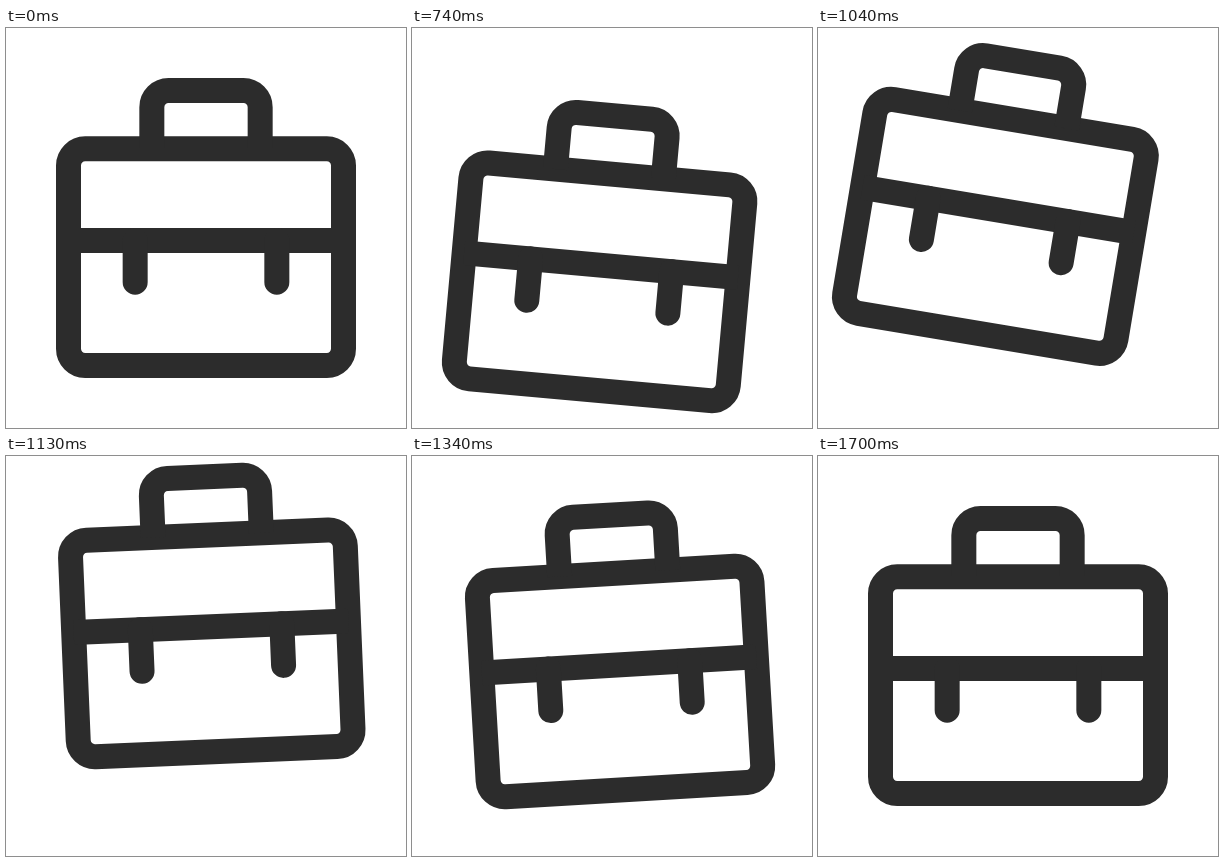
An HTML page for the animation above (1.76 s loop, 400 by 400 pixels).

```html
<!DOCTYPE html>
<html lang="en">
<head>
<meta charset="utf-8">
<title>Swinging briefcase</title>
<style>
  html, body { margin: 0; width: 100%; height: 100%; overflow: hidden; background: #fff; }
  svg { display: block; width: 100%; height: 100%; }
  #case { fill: none; stroke: #2c2c2c; stroke-width: 1.5; }
</style>
</head>
<body>
<svg viewBox="0 0 24 24">
  <g id="case">
    <rect x="3.75" y="7.25" width="16.5" height="13" rx="1"/>
    <path d="M8.75 7.25V4.75a1 1 0 0 1 1-1h4.5a1 1 0 0 1 1 1v2.5"/>
    <path d="M3.75 12.75h16.5"/>
    <path d="M7.75 12.75v2.5M16.25 12.75v2.5" stroke-linecap="round"/>
  </g>
</svg>
<script>
const LOOP = 1760, START = 500, STEP = 30;
const PIVOT = [12, 5.5];

// [step, value] pairs, eased in and out between neighbours
const ANGLE = [[2, 0], [15.9, 13], [25, -13.1], [31.7, 10], [39.7, 0]];
const LIFT = [[0, 0], [10, 1.69], [21, -2.5], [29.5, 0]];

const smooth = x => x * x * (3 - 2 * x);

function valueAt(keys, n) {
  if (n <= keys[0][0]) return keys[0][1];
  for (let i = 1; i < keys.length; i++) {
    const [n0, v0] = keys[i - 1], [n1, v1] = keys[i];
    if (n < n1) return v0 + (v1 - v0) * smooth((n - n0) / (n1 - n0));
  }
  return keys[keys.length - 1][1];
}

const bag = document.getElementById('case');
const t0 = performance.now();

function draw() {
  const t = (performance.now() - t0) % LOOP;
  const n = Math.floor((t - START) / STEP);
  const angle = valueAt(ANGLE, n), lift = valueAt(LIFT, n);
  bag.setAttribute('transform', `translate(0 ${lift}) rotate(${angle} ${PIVOT})`);
  requestAnimationFrame(draw);
}
draw();
</script>
</body>
</html>
```
